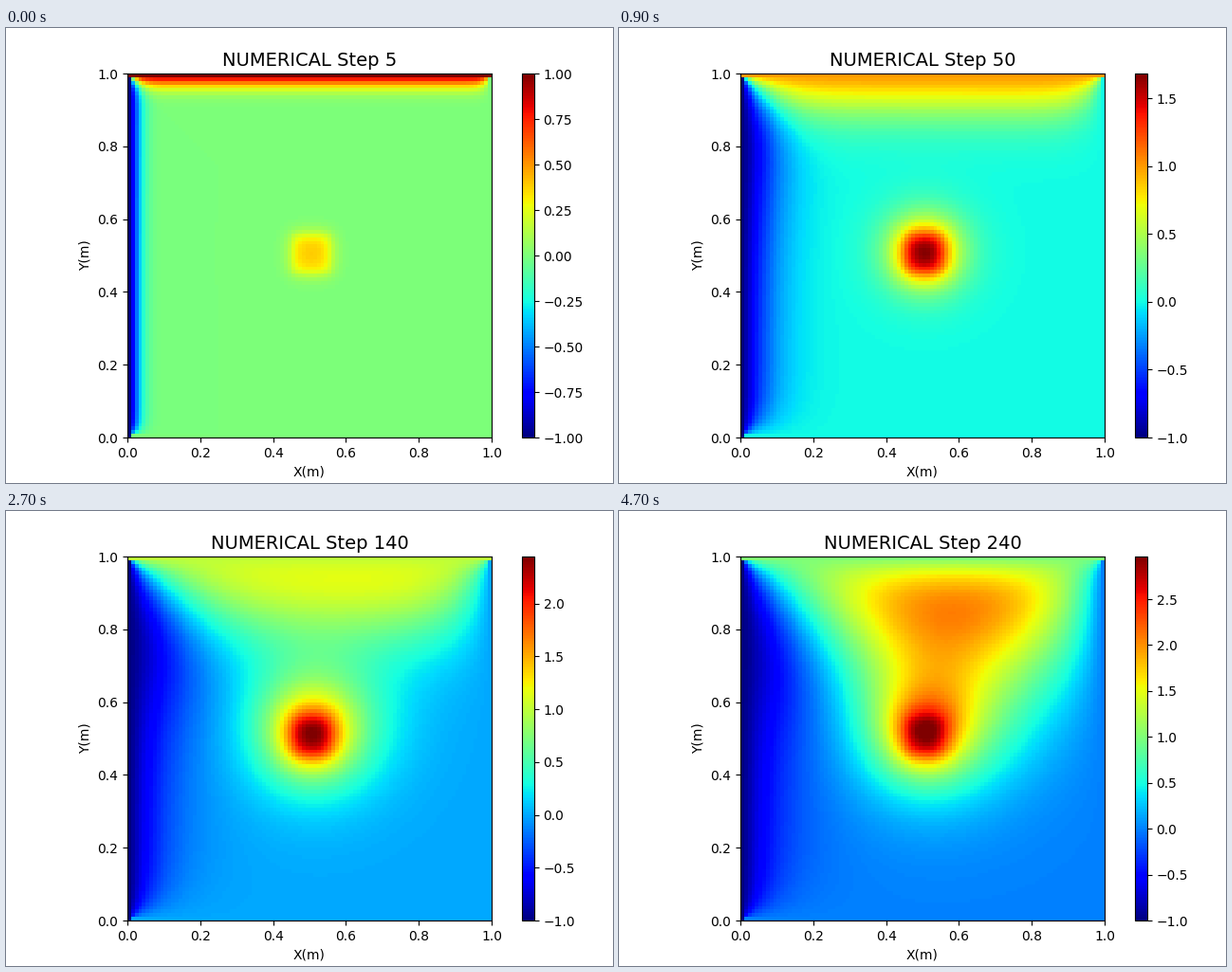
A matplotlib script for the animation above (4800 ms loop, 640x480 px).

```python
import numpy as np
import matplotlib.pyplot as plt
from matplotlib.animation import FuncAnimation

N = 100            # cells per side
STRIDE = 5         # time steps between pictures
FRAMES = 48
SUB = 5            # explicit sub-steps per time step
DT = 1 / SUB       # in units of dx^2 / diffusivity
HEAT = 0.08        # heating rate of the central block
GAIN = 0.012       # strength of the growth / loss term

# Upper colour limit, nearly linear in log(step)
KNOT_STEP = [18.5, 30, 50, 100, 140, 210, 240]
KNOT_MAX = [1.0, 1.333, 1.682, 2.182, 2.444, 2.813, 2.965]


def apply_walls(u):
    u[0, :] = 0
    u[:, -1] = 0
    u[:, 0] = -1
    u[-1, :] = 1


def solve():
    """Heat fields at every STRIDE-th step."""
    c = (np.arange(N) + 0.5) / N
    x, y = np.meshgrid(c, c)
    growth = GAIN * np.tanh(4 * (y - 0.5) + 1.4 * (x - 0.5))[1:-1, 1:-1]
    source = np.zeros((N, N))
    source[45:56, 45:56] = HEAT
    source = source[1:-1, 1:-1]

    u = np.zeros((N, N))
    apply_walls(u)
    fields = []
    for _ in range(FRAMES):
        for _ in range(STRIDE * SUB):
            mid = u[1:-1, 1:-1]
            lap = (u[2:, 1:-1] + u[:-2, 1:-1] + u[1:-1, 2:]
                   + u[1:-1, :-2] - 4 * mid)
            u[1:-1, 1:-1] = mid + DT * (lap + growth * mid + source)
        fields.append(u.copy())
    return fields


def upper_limit(step):
    return float(np.interp(np.log(step), np.log(KNOT_STEP), KNOT_MAX))


fields = solve()

fig = plt.figure(figsize=(6.4, 4.8), dpi=100)
ax = fig.add_axes([0.2, 0.1, 0.6, 0.8])
cax = fig.add_axes([0.85, 0.1, 0.02, 0.8])

im = ax.imshow(fields[0], cmap="jet", vmin=-1, vmax=1, origin="lower",
               extent=(0, 1, 0, 1), aspect="auto", interpolation="nearest")
ax.set_xlabel("X(m)")
ax.set_ylabel("Y(m)")
title = ax.set_title("", fontsize=14)
fig.colorbar(im, cax=cax)


def draw(i):
    step = STRIDE * (i + 1)
    im.set_data(fields[i])
    im.set_clim(-1, upper_limit(step))
    title.set_text(f"NUMERICAL Step {step}")
    return im, title


anim = FuncAnimation(fig, draw, frames=FRAMES, interval=100,
                     repeat=True, repeat_delay=0, blit=False)
plt.show()
```
